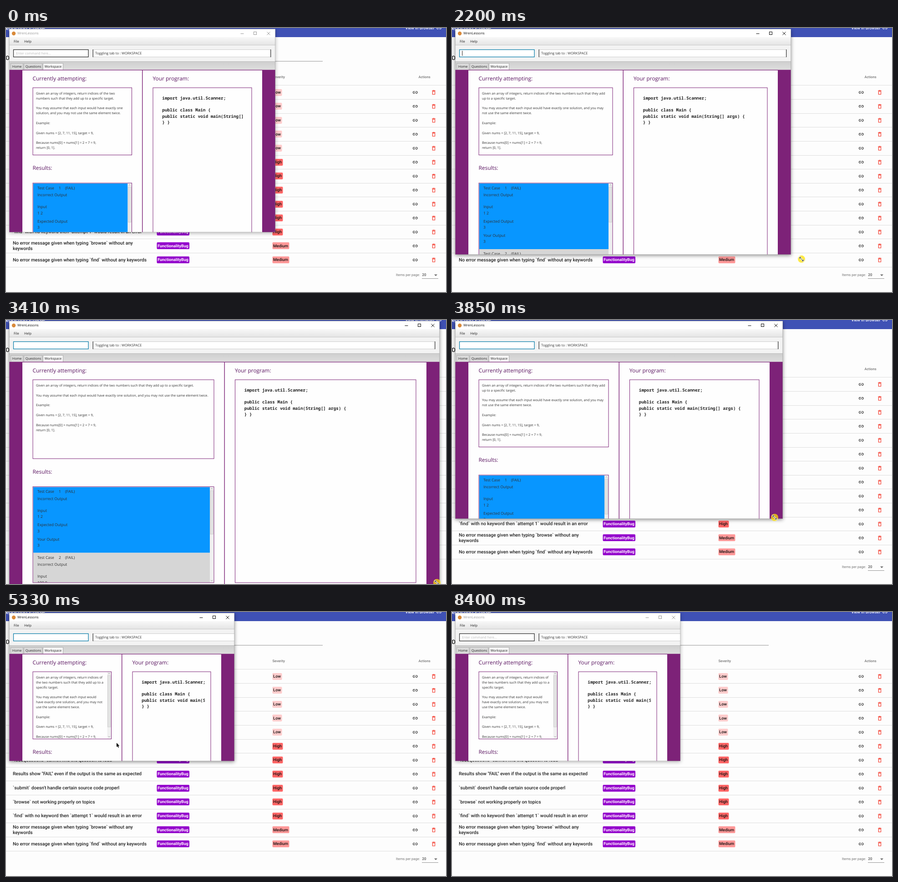
These frames come from a looping animation (967 px wide and 579 px high, 8520 ms). An HTML page with a canvas:

```html
<!DOCTYPE html>
<html lang="en">
<head>
<meta charset="utf-8">
<title>Window resizing</title>
<style>
html, body { margin: 0; width: 100%; height: 100%; overflow: hidden; background: #fdfdfd; }
canvas { display: block; }
</style>
</head>
<body>
<canvas id="stage" width="967" height="579"></canvas>
<script>
const ctx = document.getElementById('stage').getContext('2d');
const LOOP = 8520, TICK = 110, PURPLE = '#7d2278';
const PROBLEM = [
  'Given an array of integers, return indices of the two numbers such that they add up to a specific target.', '',
  'You may assume that each input would have exactly one solution, and you may not use the same element twice.', '',
  'Example:', '', 'Given nums = [2, 7, 11, 15], target = 9,', '',
  'Because nums[0] + nums[1] = 2 + 7 = 9,', 'return [0, 1].'];
const CODE = ['import java.util.Scanner;', '', 'public class Main {',
  'public static void main(String[] args) {', '} }'];
// The first six titles always stay behind the window
const ISSUES = ['', '', '', '', '', '', '`loadquestions` cannot find the question to load',
  'Results show "FAIL" even if the output is the same as expected',
  "`submit` doesn't handle certain source code properl",
  '`browse` not working properly on topics',
  '`find` with no keyword then `attempt 1` would result in an error',
  'No error message given when typing `browse` without any|keywords',
  'No error message given when typing `find` without any keywords'];
const LEVELS = { Low: ['#ffcccc', 21], High: ['#ff6666', 23], Medium: ['#ff9999', 37] };

// Key points: time, right edge, bottom edge
const SIZE = [[1860, 592, 448], [2530, 894, 545], [2760, 957, 590], [3160, 957, 590],
  [3410, 953, 587], [3850, 727, 436], [4050, 502, 327]];
// Key points: time, x, y
const POINTER = [[100, -5, 500], [540, 590, 449], [1860, 594, 449], [2530, 937, 563],
  [2760, 957, 583], [3160, 957, 583], [3410, 947, 576], [3850, 709, 433], [4180, 480, 330],
  [4910, 310, 270], [5280, 243, 287], [5500, 172, 296], [5880, 171, 288], [6200, 101, 160],
  [6700, 170, 295], [7150, 118, 302], [7510, 60, 300], [7840, -30, 462]];

function track(keys, t) {
  const i = keys.findIndex(k => k[0] > t);
  if (i === 0) return keys[0].slice(1);
  if (i < 0) return keys[keys.length - 1].slice(1);
  const a = keys[i - 1], b = keys[i], u = (t - a[0]) / (b[0] - a[0]);
  return [a[1] + (b[1] - a[1]) * u, a[2] + (b[2] - a[2]) * u];
}

const sans = px => px + 'px "Open Sans", "Noto Sans", sans-serif';
const roboto = (px, weight = 500) => weight + ' ' + px + 'px Roboto, sans-serif';
function text(s, x, y, font, color) {
  ctx.font = font;
  ctx.fillStyle = color;
  ctx.fillText(s, x, y);
}
function fill(x, y, w, h, color) {
  ctx.fillStyle = color;
  ctx.fillRect(x, y, w, h);
}
function round(x, y, w, h, r, color) {
  ctx.fillStyle = color;
  ctx.beginPath();
  ctx.roundRect(x, y, w, h, r);
  ctx.fill();
}
function frame(x, y, w, h, color, width = 1) {
  ctx.strokeStyle = color;
  ctx.lineWidth = width;
  ctx.strokeRect(x, y, w, h);
}
function line(points, color, width = 1) {
  ctx.strokeStyle = color;
  ctx.lineWidth = width;
  ctx.beginPath();
  points.forEach(p => ctx.lineTo(...p));
  ctx.stroke();
}
function poly(points, color) {
  ctx.fillStyle = color;
  ctx.beginPath();
  points.forEach(p => ctx.lineTo(...p));
  ctx.fill();
}
function disc(x, y, r, color) {
  ctx.fillStyle = color;
  ctx.beginPath();
  ctx.arc(x, y, r, 0, 7);
  ctx.fill();
}
function clipped(x, y, w, h, draw) {
  ctx.save();
  ctx.beginPath();
  ctx.rect(x, y, w, h);
  ctx.clip();
  draw();
  ctx.restore();
}
function shade(y, h, top, bottom) {
  const g = ctx.createLinearGradient(0, y, 0, y + h);
  g.addColorStop(0, top);
  g.addColorStop(1, bottom);
  return g;
}
function wrap(paragraphs, width) {
  const out = [];
  ctx.font = sans(7.25);
  for (const p of paragraphs) {
    let row = '';
    for (const word of p.split(' ')) {
      const next = row ? row + ' ' + word : word;
      if (ctx.measureText(next).width > width) {
        out.push(row);
        row = word;
      } else row = next;
    }
    out.push(row);
  }
  return out;
}

function linkIcon(x, y, color) {
  ctx.strokeStyle = color;
  ctx.lineWidth = 1.1;
  for (const s of [-1, 1]) {
    ctx.beginPath();
    ctx.moveTo(x + s, y - 2.2);
    ctx.lineTo(x + s * 2.6, y - 2.2);
    ctx.arc(x + s * 2.6, y, 2.2, -Math.PI / 2, Math.PI / 2, s < 0);
    ctx.lineTo(x + s, y + 2.2);
    ctx.stroke();
  }
  line([[x - 2, y], [x + 2, y]], color, 1.1);
}
function trashIcon(x, y) {
  const red = '#f44336';
  fill(x - 3.7, y - 4.4, 7.4, 1.2, red);
  fill(x - 1.7, y - 5, 3.4, 1, red);
  frame(x - 2.6, y - 2.2, 5.2, 6.4, red, 1.2);
}

function page(px, py, hover) {
  fill(0, 0, 967, 579, '#fdfdfd');
  fill(0, 0, 967, 20, '#3f51b5');
  text('eporting Phase', -1, 0, roboto(12.8), '#fff');
  text('View in Browser', 877.5, 0, roboto(8.94), '#fff');
  linkIcon(951.5, 0, '#fff');
  text('O', -1, 66.5, roboto(12.8), '#222');
  fill(300, 72.5, 396, 1, '#949494');
  text('Severity', 585.5, 108, roboto(7.66), '#757575');
  text('Actions', 906.5, 108, roboto(7.66), '#757575');
  fill(0, 125, 967, 1, '#dedede');
  ISSUES.forEach((title, i) => {
    const y = 141 + i * 30.625, top = Math.round(y - 15), tag = Math.round(y - 7.5);
    if (hover && px > 0 && py >= top && py < top + 30) fill(0, top, 967, 30, '#f5f5f5');
    fill(0, top + 30, 967, 1, '#dedede');
    const rows = title.split('|');
    rows.forEach((s, k) => text(s, 15, y + (k - (rows.length - 1) / 2) * 12.2, roboto(10.2), '#222'));
    round(331.5, tag, 71.5, 15, 2, '#9400cc');
    text('FunctionalityBug', 333.2, y, roboto(8.94, 700), '#fff');
    const level = i < 5 ? 'Low' : i < 11 ? 'High' : 'Medium';
    const [color, w] = LEVELS[level];
    round(585.5, tag, w, 15, 2, color);
    text(level, 587.3, y, roboto(8.94), '#111');
    linkIcon(899.3, y + .2, '#333');
    trashIcon(940, y + .3);
  });
  text('Items per page:', 857, 542, roboto(7.66, 400), '#757575');
  text('20', 914.5, 542, roboto(8, 400), '#222');
  poly([[941, 540.5], [948, 540.5], [944.5, 544]], '#666');
  fill(914, 549, 36, 1, '#949494');
}

function scrollbar(x, y, h, ratio) {
  fill(x, y, 8.5, h, '#f0f0f0');
  const c = x + 4.2, end = y + h - 4, len = (h - 18) * ratio;
  line([[c - 2, y + 5], [c, y + 3], [c + 2, y + 5]], '#888', .9);
  line([[c - 2, end - 1], [c, end + 1], [c + 2, end - 1]], '#888', .9);
  round(x + 1, y + 8, 6.5, len, 1.5, '#e3e3e3');
  frame(x + 1, y + 8, 6.5, len, '#c4c4c4', .7);
}

function testCase(y, n, input) {
  const put = (s, x, dy) => text(s, x, y + dy, sans(8.45), '#303030');
  put('Test Case', 69, 11.5);
  put(n, 116, 11.5);
  put('(FAIL)', 130, 11.5);
  put('Incorrect Output', 69, 27);
  [['Input', input], ['Expected Output', '3'], ['Your Output', '3']].forEach(([label, value], i) => {
    put(label, 69, 53 + i * 31.5);
    put(value, 69, 66.5 + i * 31.3);
  });
}

function workspace(R, B) {
  const mid = (R + 7) / 2, floor = Math.max(B, 525);
  const right = mid - 23, extra = Math.max(0, floor - 527.5);
  const boxH = 147.5 + extra * .43, top = 131 + boxH + 61.5, listH = floor - 11 - top;
  fill(7, 92, R - 7, floor - 92, '#fefefe');
  for (const x of [7, R - 29]) fill(x, 92, 29, floor - 92, PURPLE);
  for (const y of [91.7, floor - 1]) fill(7, y, R - 7, 1.2, PURPLE);
  fill(mid - .5, 92, 1.4, floor - 92, PURPLE);

  const heading = '#5a1460';
  text('Currently attempting:', 58.5, 112, sans(11.9), heading);
  text('Your program:', mid + 23, 112, sans(11.9), heading);
  text('Results:', 58.5, top - 32, sans(11.9), heading);

  let rows = wrap(PROBLEM, right - 73);
  const scrolls = rows.length * 10.85 + 14 > boxH;
  if (scrolls) rows = wrap(PROBLEM, right - 82.5);
  clipped(59, 131, right - 59, boxH - 1, () => {
    rows.forEach((s, i) => text(s, 66, 144 + i * 10.85, sans(7.25), '#333'));
    if (scrolls) scrollbar(right - 9, 131, boxH - 1, .88);
  });
  frame(59, 131, right - 59, boxH, PURPLE);

  clipped(59, top, right - 59, listH, () => {
    fill(59, top, right - 59, listH, '#f4f4f4');
    fill(60, top + 1, right - 69, 144, '#0896ff');
    fill(60, top + 145, right - 69, 145, '#d6d6d6');
    testCase(top, '1', '1 2');
    testCase(top + 144.5, '2', '100 0');
    scrollbar(right - 9, top + .5, listH - 1, .5);
  });
  frame(59, top, right - 59, listH, PURPLE);

  const x = mid + 23.5, codeR = R - 52;
  frame(x, 131, codeR - x, floor - 142, PURPLE);
  clipped(x, 131, codeR - 13 - x, 400, () => CODE.forEach((s, i) =>
    text(s, x + 20.3, 154 + i * 13.4, 'bold 9.33px "Noto Sans Mono", "DejaVu Sans Mono", monospace', '#222')));
}

function app(R, B, focused, caret) {
  ctx.save();
  ctx.shadowColor = focused ? 'rgba(0,0,0,.45)' : 'rgba(0,0,0,.3)';
  ctx.shadowBlur = 8;
  ctx.shadowOffsetY = 2;
  fill(7, 2, R - 7, B - 2, '#888');
  ctx.restore();
  clipped(7, 2, R - 7, B - 2, () => {
    const w = R - 7, ink = focused ? '#111' : '#999';
    fill(7, 2, w, 18, '#fff');
    disc(17, 12, 4.2, '#d98a3a');
    text('WrenLessons', 25, 12, sans(7.5), ink);
    line([[R - 76.5, 12.5], [R - 69.5, 12.5]], ink);
    frame(R - 47.5, 8.5, 6, 6, ink);
    line([[R - 18.5, 8.5], [R - 11.5, 15.5]], ink);
    line([[R - 11.5, 8.5], [R - 18.5, 15.5]], ink);

    fill(7, 20, w, 18, shade(20, 18, '#f8f8f8', '#e4e4e4'));
    fill(7, 37, w, 1, '#c8c8c8');
    text('File', 17, 30, sans(7.4), '#222');
    text('Help', 40, 30, sans(7.4), '#222');

    fill(7, 38, w, 36, '#f3f3f3');
    fill(16.5, 47.5, 164.5, 16, '#fff');
    frame(16.5, 47.5, 164.5, 16, focused ? '#0f80ab' : '#333', 1.3);
    if (!focused) text('Enter command here...', 22, 56, sans(7.2), '#b8b8b8');
    if (caret) fill(22, 50, 1, 11, '#222');
    const outR = Math.max(R - 10, 506);
    fill(191, 47.5, outR - 191, 16, '#fff');
    frame(191, 47.5, outR - 191, 16, '#c4c4c4', .8);
    for (const x of [191.2, outR - .3]) line([[x, 47], [x, 64]], '#333', 1.2);
    text('Toggling tab to : WORKSPACE', 196, 56, sans(7.6), '#333');

    fill(7, 74, w, 18, shade(74, 18, '#cfcfcf', '#dedede'));
    fill(7, 73, w, 1, '#bdbdbd');
    [['Home', 10.5, 27], ['Questions', 39.5, 40], ['Workspace', 81.5, 44]].forEach(([s, x, tw], i) => {
      fill(x, 78, tw, 14, i === 2 ? '#f5f5f5' : '#dadada');
      frame(x, 77.5, tw, 15, '#b0b0b0');
      text(s, x + 3.3, 85, sans(7.25), '#222');
    });
    workspace(R, B);
    frame(7, 2, w, B - 2, '#999');
  });
}

function pointer(x, y, resize, pressed) {
  if (x < 0) return;
  ctx.save();
  if (pressed) disc(x, y, 8, 'rgba(255,226,0,.72)');
  ctx.translate(x, y);
  if (resize) {
    for (const [color, width] of [['#fff', 3], ['#111', 1]]) {
      line([[-3.5, -3.5], [3.5, 3.5]], color, width);
      for (const s of [-1, 1]) line([[4 * s, s], [4 * s, 4 * s], [s, 4 * s]], color, width);
    }
  } else {
    const shape = [[0, 0], [0, 9], [2, 7.2], [3.6, 10.6], [5.1, 10], [3.6, 6.7], [6.3, 6.5], [0, 0]];
    line(shape, '#fff', 1.4);
    poly(shape, '#000');
  }
  ctx.restore();
}

function draw(now) {
  const t = now % LOOP, step = Math.floor(t / TICK) * TICK;
  const focused = t >= 1860 && t < 8400;
  const [R, B] = t < 8400 ? track(SIZE, step).map(Math.round) : [502, 327];
  const [x, y] = track(POINTER, step);
  const resize = t >= 540 && t < 5120;
  ctx.textBaseline = 'middle';
  ctx.textRendering = 'geometricPrecision';
  page(x, y, !resize && (x > R || y > B));
  app(R, B, focused, focused && (t + 140) % 1000 < 470);
  pointer(x, y, resize, resize && focused);
}
function tick() {
  draw(performance.now());
  requestAnimationFrame(tick);
}
tick();
</script>
</body>
</html>
```
